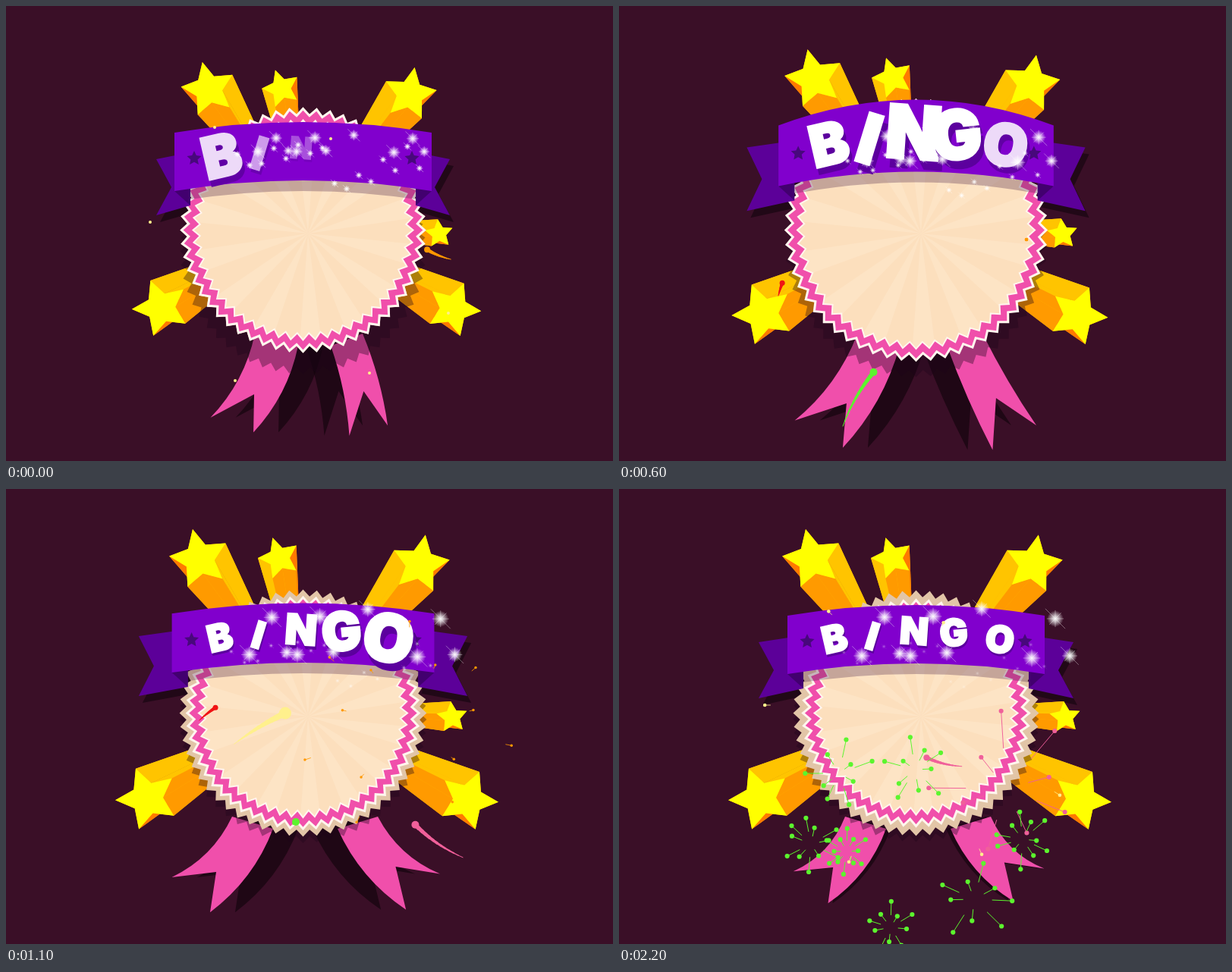
An HTML page with a canvas that plays this animation: 800 by 600 pixels, repeating every 2.25 s.

```html
<!DOCTYPE html>
<html lang="en">
<head>
<meta charset="utf-8">
<title>Bingo badge</title>
<style>
  html, body { margin: 0; width: 100%; height: 100%; overflow: hidden; background: #3a0f27; }
  canvas { display: block; width: 800px; height: 600px; }
</style>
</head>
<body>
<canvas id="stage" width="800" height="600"></canvas>
<script>
const c = document.getElementById('stage').getContext('2d');
const LOOP = 2250, STEP = 50, TAU = Math.PI * 2, RAD = Math.PI / 180;
const CX = 391.5, CY = 295.5, VANISH_Y = 292, HALF = 169.5;
const PINK = '#f04fab', YELLOW = '#fff08c', GREEN = '#5cf52e', ORANGE = '#ff9800', RED = '#f01414', ROSE = '#f0609a';

const clamp = v => Math.max(0, Math.min(1, v));
const mix = (a, b, p) => a + (b - a) * p;
const easeOut = u => 1 - (1 - clamp(u)) ** 2;
const smooth = u => (1 - Math.cos(Math.PI * clamp(u))) / 2;
const rand = n => { const s = Math.sin(n * 127.1 + 11.7) * 43758.5453; return s - Math.floor(s); };
// Rises from 0 to 1 in 450 ms, then sinks back.
const swell = (t, fall) => t < 450 ? easeOut(t / 450) : 1 - smooth((t - 450) / fall);

const STARS = [
  { x: 255, y: 92, r: 40, deg: -103, lit: -1 },
  { x: 360, y: 91, r: 28, deg: -108, lit: 1 },
  { x: 546, y: 99, r: 39, deg: -80, lit: 1 },
  { x: 186, y: 408, r: 42, deg: 177, lit: -1 },
  { x: 609, y: 410, r: 40, deg: -68, lit: 1 },
  { x: 588, y: 301, r: 21, deg: -95, lit: 1 }
];
// Angles and offsets as [start, end] of the swing, measured outward from the pivot.
const RIBBONS = [
  { side: -1, tip: [32, 56], notch: [9, 40], fork: [6, 29], outer: [12, 42], inner: [-45, -12], bow: [9, 10] },
  { side: 1, tip: [26, 59], notch: [20, 46], fork: [4, 34], outer: [27, 47], inner: [-15, -6], bow: [-4, 10] }
];
const LETTERS = [
  { ch: 'B', x: 284, y: 197, turn: -13 },
  { ch: 'I', x: 334, y: 194, turn: 17 },
  { ch: 'N', x: 389, y: 187, turn: 4 },
  { ch: 'G', x: 441, y: 189, turn: -6 },
  { ch: 'O', x: 502, y: 198, turn: 10 }
];
const GLINTS = [[320, 220], [350, 169], [384, 220], [370, 217], [414, 168],
  [478, 158], [432, 216], [575, 171], [544, 223], [594, 220]];
const ROCKETS = [
  { start: -150, life: 300, end: 640, from: [618, 337], to: [537, 308], color: ORANGE, size: 4 },
  { start: 300, life: 700, end: 1350, from: [283, 600], to: [382, 439], color: GREEN, size: 5 },
  { start: 550, life: 700, end: 1700, from: [210, 382], to: [281, 285], color: RED, size: 3.5 },
  { start: 640, life: 650, end: 1770, from: [184, 485], to: [392, 285], color: YELLOW, size: 8 },
  { start: 1000, life: 300, end: 1300, from: [612, 490], to: [500, 385], color: ROSE, size: 5 },
  { start: 2060, life: 400, end: LOOP, from: [462, 366], to: [370, 330], color: ROSE, size: 4 }
];
// Arms of the last yellow burst end here and burst again when the loop restarts.
const FLARES = [[190, 285], [583, 405], [275, 160], [479, 484], [302, 494], [428, 175]];
const GREEN_SPOTS = [[290, 375], [390, 370], [253, 468], [300, 478], [468, 541], [358, 578], [532, 462]];
const BURSTS = [
  { start: 670, life: 510, x: 530, y: 312, r: 138, arms: 14, color: ORANGE, size: 3.5 },
  { start: 1350, life: 700, x: 385, y: 440, r: 150, arms: 18, color: GREEN, size: 4 },
  { start: 1300, life: 460, x: 500, y: 385, r: 130, arms: 12, color: ROSE, size: 4 },
  { start: 1700, life: 480, x: 281, y: 286, r: 72, arms: 15, color: RED, size: 2.4 },
  { start: 2000, life: 500, x: 510, y: 395, r: 150, arms: 9, color: ROSE, size: 4 },
  ...FLARES.map(([x, y], i) => i < 3
    ? { start: 70, life: 450, x, y, r: 90, arms: 5, color: YELLOW, size: 5.5 }
    : { start: 170, life: 400, x, y, r: 112, arms: 7, color: YELLOW, size: 5 }),
  ...GREEN_SPOTS.map(([x, y], i) => (
    { start: 2040, life: 420, x, y, r: 42 + 38 * rand(i), arms: 9 + i % 4, color: GREEN, size: 4 }))
];

function polygon(pts, fill) {
  c.beginPath();
  pts.forEach(([x, y]) => c.lineTo(x, y));
  c.closePath();
  if (fill) { c.fillStyle = fill; c.fill(); }
}
function circle(x, y, r, fill) {
  c.beginPath();
  c.arc(x, y, r, 0, TAU);
  c.fillStyle = fill;
  c.fill();
}
function line(x0, y0, x1, y1, width) {
  c.lineWidth = width;
  c.beginPath();
  c.moveTo(x0, y0);
  c.lineTo(x1, y1);
  c.stroke();
}
function starPoints(x, y, r, deg, inner) {
  return Array.from({ length: 10 }, (_, i) => {
    const a = (deg + i * 36) * RAD, d = i % 2 ? r * inner : r;
    return [x + d * Math.cos(a), y + d * Math.sin(a)];
  });
}
function zigzag(y, high, depth = 9, teeth = 56) {
  return Array.from({ length: teeth * 2 }, (_, i) => {
    const a = i * Math.PI / teeth - Math.PI / 2, d = high - (i % 2) * depth;
    return [CX + d * Math.cos(a), y + d * Math.sin(a)];
  });
}

// A star whose sides run back to a vanishing point behind the badge.
function drawStar(s, near) {
  const x = mix(s.x, CX, near), y = mix(s.y, VANISH_Y, near);
  const pts = starPoints(x, y, s.r * (1 - near), s.deg, .5);
  const toward = Math.atan2(VANISH_Y - y, CX - x) / RAD;
  const deep = ([px, py]) => [mix(px, CX, .62), mix(py, VANISH_Y, .62)];
  const faces = pts.map((p, i) => {
    const q = pts[(i + 1) % 10];
    const notch = s.deg + (i % 2 ? i : i + 1) * 36;
    const turn = ((notch - toward + 540) % 360 + 360) % 360 - 180;
    const d = turn * -s.lit;
    const seen = (q[1] - p[1]) * (CX - p[0]) - (q[0] - p[0]) * (VANISH_Y - p[1]) > 0;
    const rank = !seen ? 0 : d < -20 ? 2 : d < 60 ? 3 : 1;
    return { rank, quad: [p, q, deep(q), deep(p)] };
  });
  const tones = ['#ffb800', '#ff7a00', '#ffc400', '#ff9a00'];
  faces.sort((a, b) => a.rank - b.rank).forEach(f => polygon(f.quad, tones[f.rank]));
  polygon(pts, '#ffff00');
}

function drawRibbon(r, t, shift, fill) {
  const swing = clamp(t / 1100), w = swing ** 1.3, grow = swell(t, 1300);
  const px = CX + r.side * 51.5 - r.side * shift, py = 430;
  const spot = ([from, to], len) => {
    const a = mix(from, to, w) * RAD;
    return [px + r.side * len * Math.sin(a), py + len * Math.cos(a)];
  };
  const long = 133 + 27 * grow + (r.side > 0 ? 4 : 0);
  const tip = spot(r.tip, long), fork = spot(r.fork, long);
  const notch = spot(r.notch, 83 + 16 * grow + 7 * swing);
  const outer = [px + r.side * mix(...r.outer, w), 432], inner = [px + r.side * mix(...r.inner, w), 448];
  const bow = 2 * mix(...r.bow, w);
  const bend = (a, b, end) => {
    const dx = b[0] - a[0], dy = b[1] - a[1], k = -r.side * bow / Math.hypot(dx, dy);
    c.quadraticCurveTo((a[0] + b[0]) / 2 + Math.abs(dy) * k,
      (a[1] + b[1]) / 2 + Math.abs(dx) * Math.abs(k) * Math.sign(bow), end[0], end[1]);
  };
  c.beginPath();
  c.moveTo(...outer);
  bend(outer, tip, tip);
  c.lineTo(...notch);
  c.lineTo(...fork);
  bend(inner, fork, inner);
  c.closePath();
  c.fillStyle = fill;
  c.fill();
}

function drawDisc(pink, back) {
  polygon(zigzag(CY, back), '#e2c5a7');
  c.lineJoin = 'miter';
  c.lineWidth = 3;
  c.strokeStyle = '#fff6ee';
  polygon(zigzag(CY, pink - 1), PINK);
  c.stroke();
  const face = zigzag(CY, pink - 16);
  polygon(face, '#fcdfbd');
  c.save();
  c.clip();
  for (let i = 0; i < 14; i++) {
    const ray = a => [398 + 200 * Math.cos(a), 300 + 200 * Math.sin(a)];
    const a = i * TAU / 14 + .1;
    polygon([[398, 300], ray(a), ray(a + .2)], 'rgba(255,238,216,.3)');
  }
  c.restore();
  polygon(face);
  c.lineWidth = 2;
  c.stroke();
}

function bannerPath(b, dy = 0) {
  const l = CX - b.half, r = CX + b.half;
  c.beginPath();
  c.moveTo(l, b.top + dy);
  c.quadraticCurveTo(CX, 2 * b.topMid - b.top + dy, r, b.top + dy);
  c.lineTo(r, b.bottom + dy);
  c.quadraticCurveTo(CX, 2 * b.bottomMid - b.bottom + dy, l, b.bottom + dy);
  c.closePath();
}

function drawTails(b, t, fill, dx = 0, dy = 0) {
  const lift = swell(t, 1300);
  const reach = b.half + 24 + 20 * easeOut(t / 900) - 6 * smooth((t - 1000) / 700);
  const top = 202 - 16 * lift + dy, mid = 239 - 11 * lift + dy, bottom = 276 - 6 * lift + dy;
  for (const s of [-1, 1]) {
    const X = v => CX + s * v + dx, root = b.half - 21;
    polygon([[X(reach), top], [X(root), top - 9], [X(root), b.bottom + 19 + dy],
      [X(reach), bottom], [X(reach - 20), mid]], fill);
  }
}

function drawBanner(b) {
  for (const s of [-1, 1]) {
    const x = CX + s * b.half, fold = x - s * 21;
    polygon([[x, b.bottom], [fold, b.bottom - 6], [fold, b.bottom + 19]], '#42006f');
  }
  bannerPath(b);
  c.fillStyle = '#8100cd';
  c.fill();
  for (const s of [-1, 1]) {
    polygon(starPoints(CX + s * (b.half - 26), b.bottom - 43, 10, -90, .48), '#48087c');
  }
}

// Each letter swells 150 ms after the one before it.
function letterHeight(i, t) {
  const late = t - 300 - 150 * i;
  return late < 0 ? 74 * Math.max(0, 1 - (-late / 850) ** 1.5) : 74 - 36 * smooth(late / 650);
}

function drawLetters(b, t) {
  const midShift = (b.topMid + b.bottomMid - 383) / 2, endShift = (b.top + b.bottom - 411) / 2;
  c.textAlign = 'center';
  c.textBaseline = 'alphabetic';
  c.lineJoin = 'miter';
  c.miterLimit = 4;
  LETTERS.forEach((l, i) => {
    const h = letterHeight(i, t), f = (l.x - 222) / 339, shown = clamp((h - 14) / 52);
    const alpha = t > 300 + 150 * i ? 1 : shown;
    if (alpha === 0) return;
    const x = CX + (l.x - CX) * b.half / HALF;
    const y = l.y + mix(endShift, midShift, 4 * f * (1 - f));
    const drop = 3 + Math.max(0, h - 38) * .25;
    const edge = h * .06, cap = h - edge;
    c.font = `900 ${cap / .727}px Inter, Lato, sans-serif`;
    c.lineWidth = edge;
    const paint = (dx, dy, ink) => {
      c.save();
      c.translate(x + dx, y + dy);
      c.rotate(l.turn * RAD);
      c.fillStyle = c.strokeStyle = ink;
      c.fillText(l.ch, 0, cap / 2);
      c.strokeText(l.ch, 0, cap / 2);
      c.restore();
    };
    const tint = (r, g, bl) => `rgb(${mix(129, r, alpha)},${mix(0, g, alpha)},${mix(205, bl, alpha)})`;
    paint(drop * .4, drop, tint(92, 0, 158));
    paint(0, 0, tint(255, 255, 255));
  });
}

function glint(x, y, r, alpha) {
  c.save();
  c.globalAlpha = alpha;
  const g = c.createRadialGradient(x, y, 0, x, y, r);
  g.addColorStop(0, '#fff');
  g.addColorStop(.3, 'rgba(255,255,255,.8)');
  g.addColorStop(1, 'rgba(255,255,255,0)');
  circle(x, y, r, g);
  c.strokeStyle = 'rgba(255,255,255,.55)';
  for (let i = 0; i < 4; i++) {
    const a = i * 45 * RAD, len = r * (i === 1 ? 1.7 : 1);
    const dx = len * Math.cos(a), dy = len * Math.sin(a);
    line(x - dx, y - dy, x + dx, y + dy, .7);
  }
  c.restore();
}

function drawGlints(t) {
  const p = smooth(t / 1300);
  GLINTS.forEach(([x, y], i) => glint(
    mix(x - (x - 380) * .2, x, p), mix(185 + (y - 200) * .35, y, p), mix(6, 9, p) + rand(i) * 2, .95));
  for (let i = 0; i < 16; i++) {
    const x = 305 + i * 16, y = mix(178, 242, rand(i + 40));
    glint(x + (x - CX) * .1 * p, y + 20 * p, mix(4, 2.5, p), 1 - .8 * clamp((t - 400) / 900));
  }
}

function drawRocket({ start, life, end, from, to, color, size }, t) {
  if (t < start || t >= end) return;
  const u = (t - start) / life, head = easeOut(u), tail = easeOut(u - .3);
  const dx = to[0] - from[0], dy = to[1] - from[1];
  const at = p => {
    const arc = .4 * p * (1 - p);
    return [from[0] + dx * p + dy * arc, from[1] + dy * p - dx * arc];
  };
  c.strokeStyle = color;
  c.lineCap = 'round';
  const parts = 12;
  for (let i = 0; i < parts; i++) {
    line(...at(mix(tail, head, i / parts)), ...at(mix(tail, head, (i + 1) / parts)), 1 + size * i / parts);
  }
  circle(...at(head), size * Math.min(1, Math.max(.4, 1.7 - u * .55)), color);
}

function drawArm(x, y, ex, ey, u, color, size) {
  const head = easeOut(u), tail = easeOut(u - .3 * (1 - .7 * u));
  const hx = mix(x, ex, head), hy = mix(y, ey, head);
  c.strokeStyle = color;
  line(mix(x, ex, tail), mix(y, ey, tail), hx, hy, Math.max(.8, size * .4 * (1 - u)));
  circle(hx, hy, size * (u < .12 ? .3 : 1 - .6 * u), color);
}

function drawBurst({ start, life, x, y, r, arms, color, size }, k, t) {
  const u = (t - start) / life;
  if (u < 0 || u >= 1) return;
  for (let i = 0; i < arms; i++) {
    const seed = k * 31 + i, a = (i + rand(seed) * .6) * TAU / arms + k * 1.3;
    const inner = arms > 8 && i % 2;
    const d = r * ((inner ? .45 : .85) + rand(seed + 500) * .25);
    drawArm(x, y, x + d * Math.cos(a), y + d * Math.sin(a), u, color, size);
  }
  if (color === YELLOW && u < .12) circle(x, y, 8, color);
}

function drawFlares(t) {
  const u = (t - 1770) / 480;
  if (u >= 0) {
    FLARES.forEach(([x, y]) => drawArm(392, 285, x, y, u, YELLOW, 5));
    if (u < .12) polygon(starPoints(393, 286, 22, -80, .6), YELLOW);
  }
  if (t < 70) FLARES.forEach(([x, y]) => circle(x, y, 2, YELLOW));
}

function draw(t) {
  const s = swell(t, 1000), s2 = s * s;
  const banner = { half: HALF + 12.5 * s, top: 167 - 10 * s, topMid: 153 - 33 * s2,
    bottom: 244 - 7 * s, bottomMid: 230 - 13 * s2 };
  const pink = 161 + 13 * s - 11 * smooth((t - 500) / 600), back = 162 + 12 * s2;
  const rim = Math.max(pink, back);
  const drop = 28 - 20 * smooth((t - 200) / 1000), shift = 33 - 27 * smooth((t - 1150) / 600);
  const near = .088 * (1 - clamp(t / 750));

  c.fillStyle = '#3a0f27';
  c.fillRect(0, 0, 800, 600);
  RIBBONS.forEach(r => drawRibbon(r, t, shift, 'rgba(18,4,12,.65)'));
  drawTails(banner, t, 'rgba(18,4,12,.6)', 5, 9);
  STARS.forEach(star => drawStar(star, near));
  RIBBONS.forEach(r => drawRibbon(r, t, 0, PINK));
  polygon(zigzag(CY + drop, rim), 'rgba(30,5,25,.36)');
  drawDisc(pink, back);
  c.save();
  polygon(zigzag(CY, rim));
  c.clip();
  bannerPath(banner, 14);
  c.fillStyle = 'rgba(70,30,70,.3)';
  c.fill();
  c.restore();
  drawTails(banner, t, '#5c0099');
  drawBanner(banner);
  drawLetters(banner, t);
  drawGlints(t);
  ROCKETS.forEach(r => drawRocket(r, t));
  BURSTS.forEach((b, k) => drawBurst(b, k, t));
  drawFlares(t);
}

const begin = performance.now();
function frame(now) {
  const t = Math.max(0, now - begin) % LOOP;
  draw(Math.floor(t / STEP) * STEP);
  requestAnimationFrame(frame);
}
draw(0);
requestAnimationFrame(frame);
</script>
</body>
</html>
```
